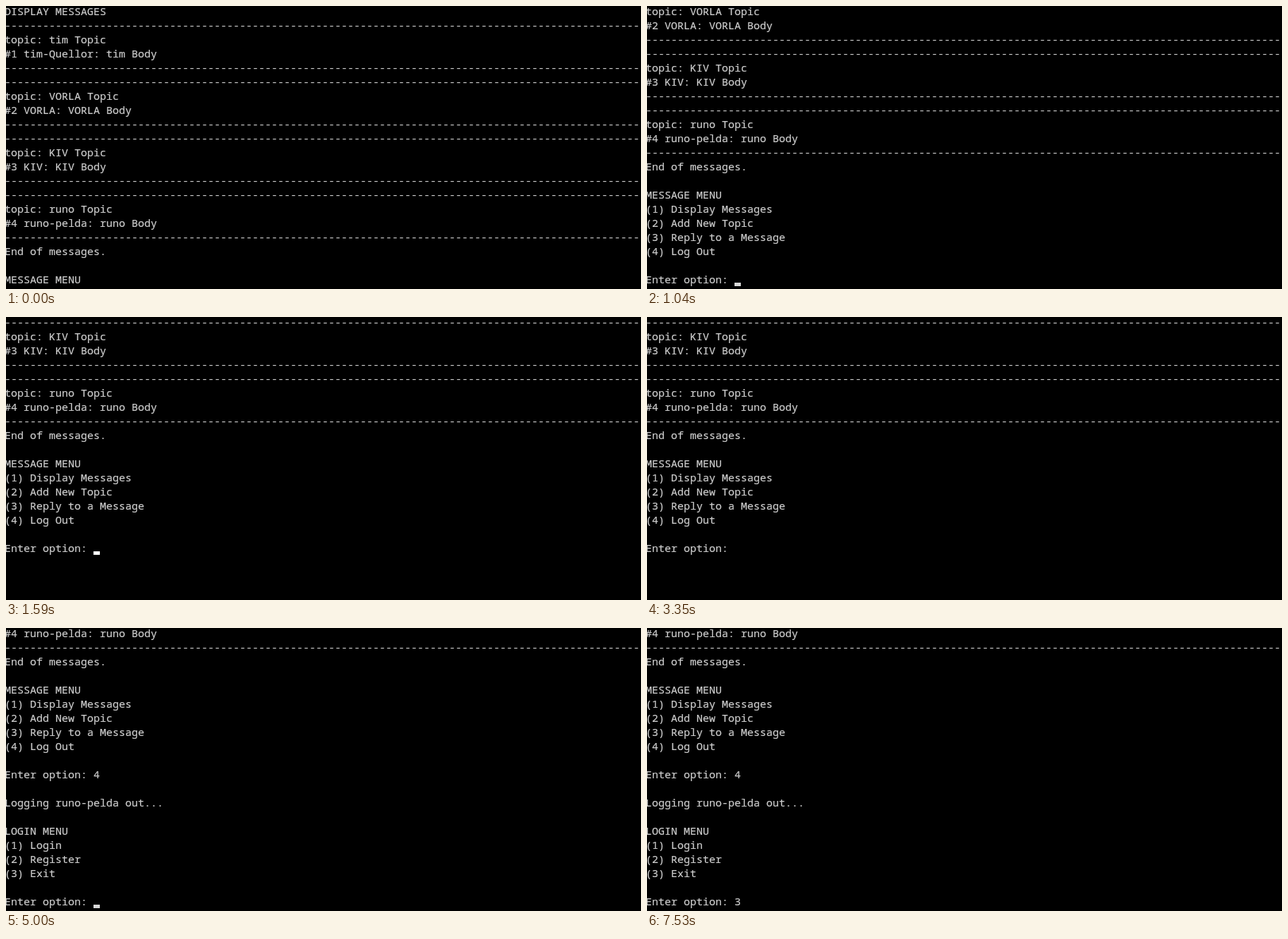
These frames come from a looping animation (900x401 px, 8 s). An HTML page:

```html
<!DOCTYPE html>
<html lang="en">
<head>
<meta charset="utf-8">
<title>Message console</title>
<style>
  html, body { margin: 0; width: 100%; height: 100%; overflow: hidden; background: #000; }
  #stage { position: relative; width: 900px; height: 401px; overflow: hidden; background: #000; }
  .row {
    position: absolute; left: -2px; height: 20px;
    font: 15px/20px "Noto Sans Mono", "DejaVu Sans Mono", monospace;
    font-variant-ligatures: none; white-space: pre; color: #ccc;
    -webkit-text-stroke: 0.2px #ccc;
  }
  .rule { -webkit-text-stroke: 0; }
  #cursor { position: absolute; width: 9px; height: 5px; }
</style>
</head>
<body>
<div id="stage"></div>
<script>
const LOOP = 8000, ROWS = 20, ROW_H = 20, COL_W = 9, LEFT = -2;
const RULE = "-".repeat(100);
const PROMPT = "Enter option: ";

const message = (id, user, name) =>
  [RULE, `topic: ${name} Topic`, `#${id} ${user}: ${name} Body`, RULE];

const lines = [
  "DISPLAY MESSAGES",
  ...message(1, "tim-Quellor", "tim"),
  ...message(2, "VORLA", "VORLA"),
  ...message(3, "KIV", "KIV"),
  ...message(4, "runo-pelda", "runo"),
  "End of messages.", "",
  "MESSAGE MENU", "(1) Display Messages", "(2) Add New Topic",
  "(3) Reply to a Message", "(4) Log Out", "",
  PROMPT, "",
  "Logging runo-pelda out...", "",
  "LOGIN MENU", "(1) Login", "(2) Register", "(3) Exit", "",
  PROMPT
];
const FIRST_PROMPT = lines.indexOf(PROMPT);
const LAST_PROMPT = lines.length - 1;

// start time, top line, prompt in use, typed answer, cursor shown
const steps = [
  [0,    0,  FIRST_PROMPT, "",  false],
  [500,  3,  FIRST_PROMPT, "",  false],
  [1040, 6,  FIRST_PROMPT, "",  true],
  [1260, 6,  FIRST_PROMPT, "",  false],
  [1590, 9,  FIRST_PROMPT, "",  true],
  [2300, 9,  FIRST_PROMPT, "",  false],
  [2840, 9,  FIRST_PROMPT, "",  true],
  [3350, 9,  FIRST_PROMPT, "",  false],
  [3900, 9,  FIRST_PROMPT, "",  true],
  [4000, 9,  FIRST_PROMPT, "4", true],
  [4930, 12, LAST_PROMPT,  "",  false],
  [5000, 15, LAST_PROMPT,  "",  true],
  [5970, 15, LAST_PROMPT,  "",  false],
  [6510, 15, LAST_PROMPT,  "3", true],
  [7530, 15, LAST_PROMPT,  "3", false]
];

const stage = document.getElementById("stage");
const addDiv = () => stage.appendChild(document.createElement("div"));

const rows = Array.from({ length: ROWS }, (_, i) => {
  const row = addDiv();
  row.style.top = `${i * ROW_H - 3}px`;
  return row;
});
const cursor = addDiv();
cursor.id = "cursor";

function lineText(index, prompt, typed) {
  if (index > prompt) return "";
  if (index === prompt) return PROMPT + typed;
  return index === FIRST_PROMPT ? PROMPT + "4" : lines[index];
}

function show([, top, prompt, typed, cursorOn]) {
  rows.forEach((row, i) => {
    const text = lineText(top + i, prompt, typed);
    row.textContent = text;
    row.className = text === RULE ? "row rule" : "row";
  });
  const cursorRow = prompt - top;
  cursor.style.left = `${LEFT + COL_W * (PROMPT.length + typed.length)}px`;
  cursor.style.top = `${cursorRow * ROW_H + 12}px`;
  cursor.style.background = cursorRow === ROWS - 1 ? "#d8d8d8" : "#fff";
  cursor.style.visibility = cursorOn ? "visible" : "hidden";
}

const start = performance.now();
let current = null;

function tick() {
  const time = (performance.now() - start) % LOOP;
  const step = steps.findLast(([at]) => at <= time);
  if (step !== current) show(current = step);
  requestAnimationFrame(tick);
}
tick();
</script>
</body>
</html>
```
